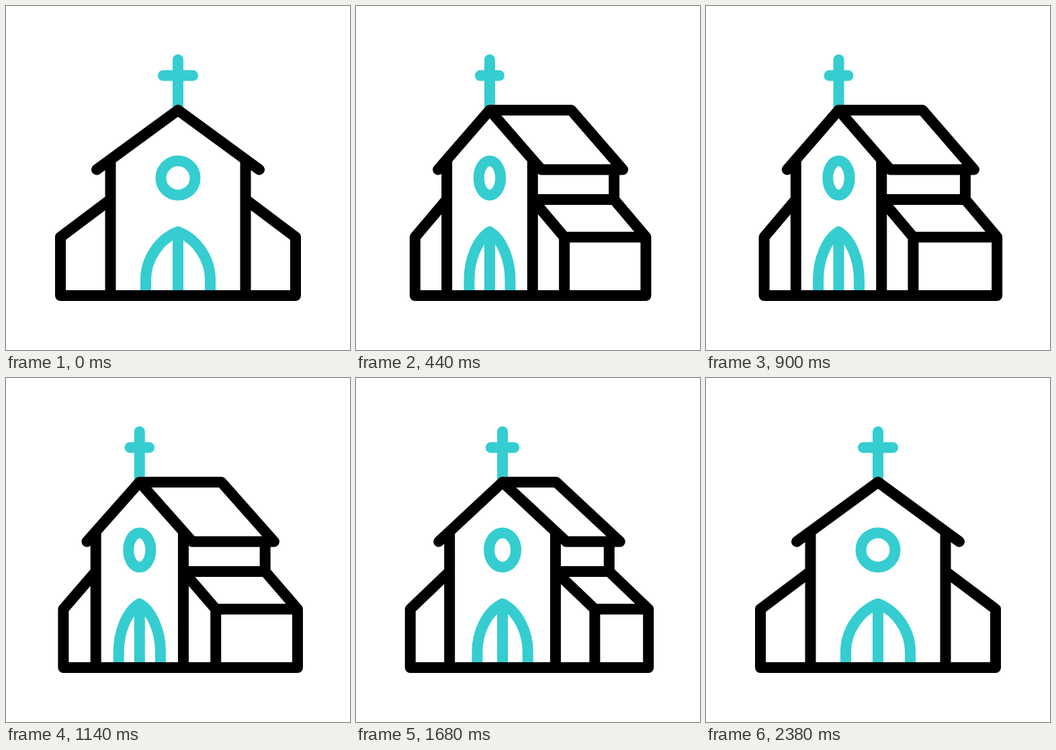
Animation of 512x512 px, one loop 2400 ms. Source, as an HTML page:

```html
<!DOCTYPE html>
<html lang="en">
<head>
<meta charset="utf-8">
<title>Turning church</title>
<style>
  html, body { margin: 0; height: 100%; overflow: hidden; background: #fff; }
  svg { display: block; width: 100%; height: 100%; }
  path, ellipse { fill: none; stroke-width: 16; stroke-linecap: round; stroke-linejoin: round; }
  .accent { stroke: #35cdd0; }
  .wall { stroke: #000; }
</style>
</head>
<body>
<svg viewBox="0 0 512 512">
  <path class="accent" id="trim"/>
  <ellipse class="accent" id="rose" cy="256" ry="25.5"/>
  <path class="wall" id="walls"/>
</svg>
<script>
const LOOP = 2400;
const [trim, rose, walls] = ['trim', 'rose', 'walls'].map(id => document.getElementById(id));

// time, front shift to the left, front width scale, depth of the side
const poses = [
  [0, 0, 1, 0],
  [440, 57, 0.635, 121.3],
  [900, 58.5, 0.634, 124.7],
  [1380, 54, 0.68, 114.5],
  [1680, 38, 0.784, 80],
  [1900, 9.7, 0.948, 20.7],
  [2160, 0, 1, 0],
  [LOOP, 0, 1, 0]
];

const slope = (i, k) => (poses[i + 1][k] - poses[i][k]) / (poses[i + 1][0] - poses[i][0]);

function tangent(i, k) {
  if (i === 0 || i === poses.length - 1) return 0;
  const a = slope(i - 1, k), b = slope(i, k);
  return a * b > 0 ? 2 * a * b / (a + b) : 0;
}

// Monotone cubic interpolation of one pose value
function valueAt(t, k) {
  let i = 0;
  while (t >= poses[i + 1][0]) i++;
  const span = poses[i + 1][0] - poses[i][0];
  const u = (t - poses[i][0]) / span, v = 1 - u;
  return poses[i][k] * v * v * (1 + 2 * u) + poses[i + 1][k] * u * u * (3 - 2 * u)
    + span * u * v * (tangent(i, k) * v - tangent(i + 1, k) * u);
}

function draw(t) {
  const center = 256 - valueAt(t, 1), scale = valueAt(t, 2), depth = valueAt(t, 3);
  const front = x => (center + x * scale).toFixed(2);
  const back = x => (center + x * scale + depth).toFixed(2);
  const door = side => `M${front(48 * side)} 431V407C${front(48 * side)} 378 ${front(29 * side)} 347 ${front(0)} 336`;

  trim.setAttribute('d',
    `M${front(0)} 80V154M${front(-22)} 103.5H${front(22)}` +
    `${door(-1)}${door(1)}M${front(0)} 336V431`);
  rose.setAttribute('cx', front(0));
  rose.setAttribute('rx', 25.5 * scale);

  walls.setAttribute('d',
    // front
    `M${front(-121)} 243.5L${front(0)} 155L${front(121)} 243.5` +
    `M${front(-100.5)} 230V431M${front(100.5)} 230V431` +
    `M${front(-100.5)} 288L${front(-175)} 344V431H${back(175)}` +
    `M${front(100.5)} 288L${front(175)} 344V431` +
    // side
    `M${front(0)} 155H${back(0)}L${back(121)} 243.5H${front(121)}` +
    `M${back(100.5)} 243.5V288` +
    `M${front(100.5)} 288H${back(100.5)}L${back(175)} 344V431` +
    `M${front(175)} 344H${back(175)}`);
}

function tick() {
  draw(performance.now() % LOOP);
  requestAnimationFrame(tick);
}
tick();
</script>
</body>
</html>
```
